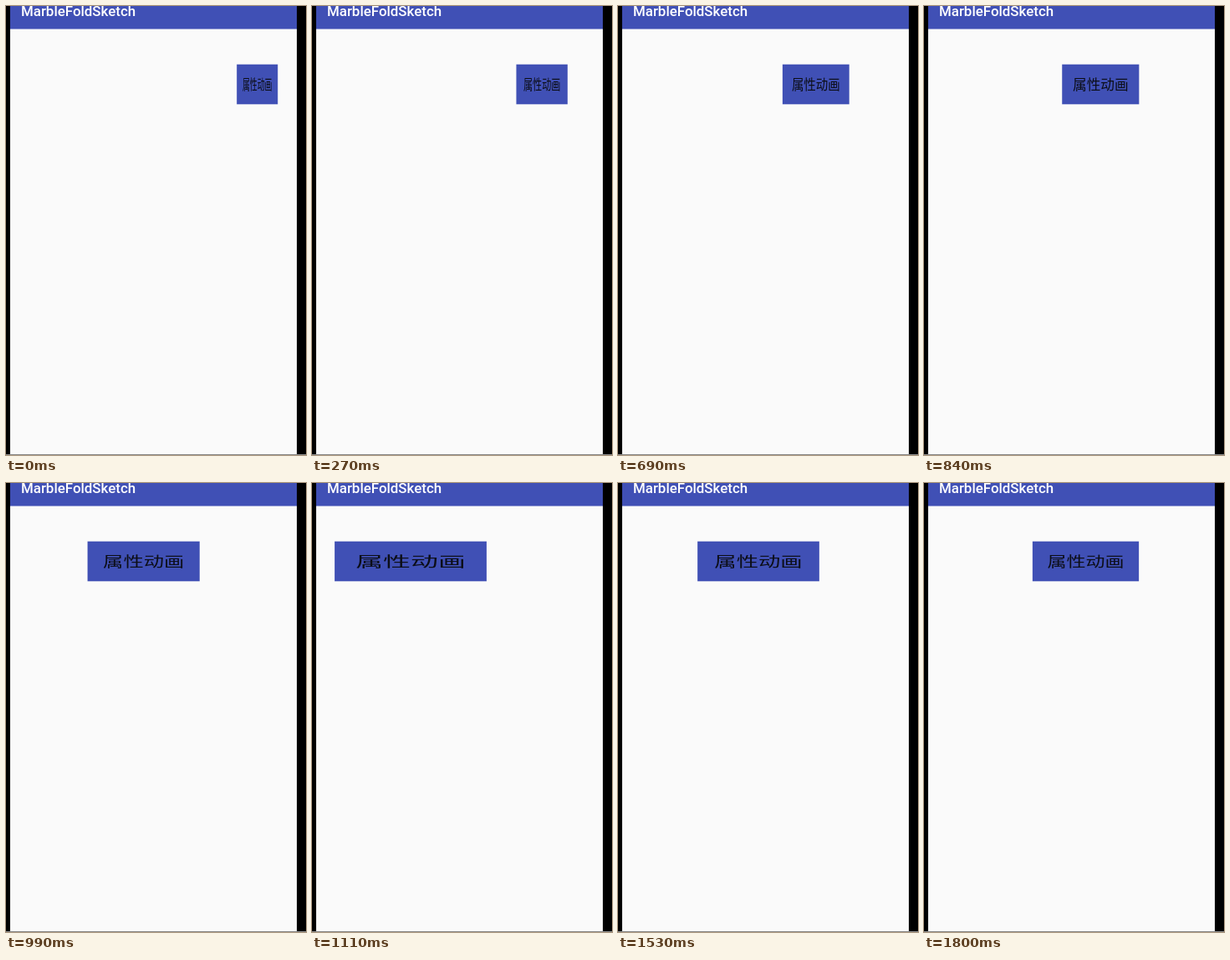
Recreate the animation shown at these times as an HTML page. Size 359 by 536 pixels, loop 1.9 s.

```html
<!DOCTYPE html>
<html lang="zh-CN">
<head>
<meta charset="utf-8">
<style>
  html, body { margin: 0; width: 100%; height: 100%; overflow: hidden; background: #000; }
  svg { display: block; }
  .blue { fill: #4050b5; }
  #title { font: 500 16.9px Roboto, sans-serif; fill: #fff; }
  #label { font: 400 17.2px "Noto Sans CJK SC", "Noto Sans CJK", sans-serif; fill: #0c0e18; text-anchor: middle; }
</style>
</head>
<body>
<svg width="359" height="536">
  <rect x="5" width="343" height="535" fill="#fafafa"/>
  <rect class="blue" x="5" width="343" height="27.5"/>
  <text id="title" x="18" y="12">MarbleFoldSketch</text>
  <g id="button">
    <rect class="blue" x="-47.5" y="69.7" width="95" height="47.6"/>
    <text id="label" y="100">属性动画</text>
  </g>
  <rect y="535" width="359" height="1" fill="#8a8a8a"/>
</svg>
<script>
const LOOP = 1900, TICK = 30, TICKS_PER_STEP = 14 / 3;
const REST = 205.3, REACH = 98.6, TURN = 8;
const button = document.getElementById("button");

// [step, centre x]: steady drift left, a rush to the far end, drift back
const path = [[0, 300.7], [5, 236.8], [6, 211.3], [TURN, 118], [10, 142], [11, 168], [13, 193.5]];

function centreAt(step) {
  const i = Math.max(1, path.findIndex(([key]) => key >= step));
  const [[s0, x0], [s1, x1]] = [path[i - 1], path[i]];
  return x0 + (x1 - x0) * (step - s0) / (s1 - s0);
}

// Scale runs 0.5 → 1 → 2 on the way left and straight from 2 to 0.5 on the way back
function scaleAt(step, x) {
  const offset = (REST - x) / REACH;
  if (step >= TURN) return 1.25 + 0.75 * offset;
  return 1 + offset * (offset < 0 ? 0.5 : 1);
}

const start = performance.now();

function draw() {
  const tick = Math.floor((performance.now() - start) % LOOP / TICK);
  const step = Math.ceil((tick + 1) / TICKS_PER_STEP) - 1;   // poses are held on a 30 ms grid
  const x = centreAt(step);
  button.setAttribute("transform", `translate(${x} 0) scale(${scaleAt(step, x)} 1)`);
  requestAnimationFrame(draw);
}
draw();
</script>
</body>
</html>
```
